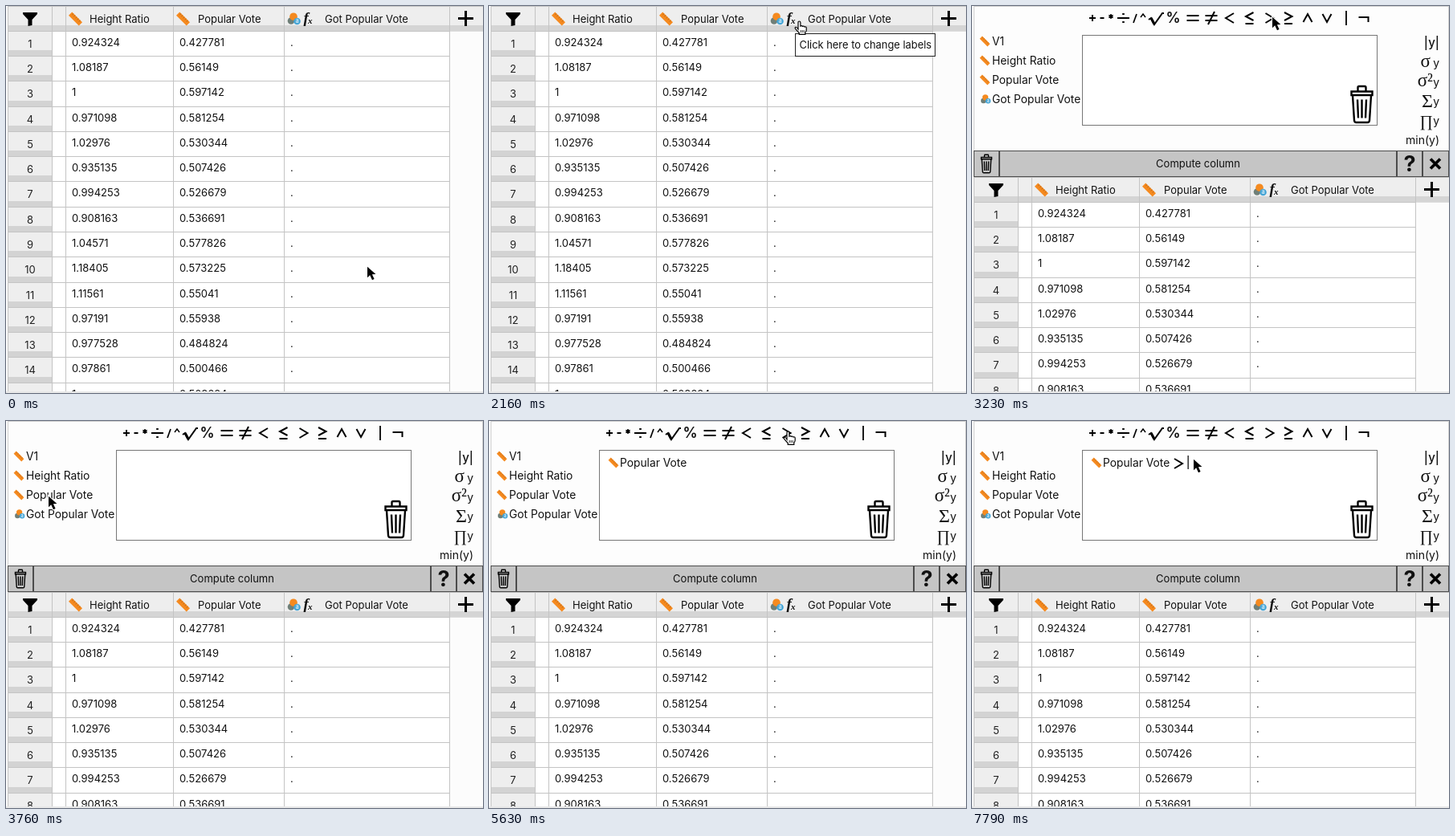
Animation of 594 by 482 pixels, one loop 8 s. Source, as an HTML page with a canvas:

```html
<!DOCTYPE html>
<html lang="en">
<head>
<meta charset="utf-8">
<title>Compute column</title>
<style>
html, body { margin: 0; width: 594px; height: 482px; overflow: hidden; background: #fff; }
canvas { display: block; }
</style>
</head>
<body>
<canvas id="stage" width="594" height="482"></canvas>
<script>
const ctx = document.getElementById('stage').getContext('2d');
const SANS = 'Inter, "Open Sans", sans-serif';
const SERIF = '"Liberation Serif", "Noto Serif", serif';
const LOOP = 8000, ROW = 31.28, PANEL = 213, BOTTOM = 480;
const ORANGE = '#f58a1f', GRID = '#c4c4c4';

const heights = ['0.924324', '1.08187', '1', '0.971098', '1.02976', '0.935135', '0.994253',
  '0.908163', '1.04571', '1.18405', '1.11561', '0.97191', '0.977528', '0.97861', '1'];
const votes = ['0.427781', '0.56149', '0.597142', '0.581254', '0.530344', '0.507426', '0.526679',
  '0.536691', '0.577826', '0.573225', '0.55041', '0.55938', '0.484824', '0.500466', '0.508224'];

// Pointer stops: start time, shape, left, top.
const stops = [
  [0, 'arrow', 449, 324], [270, 'arrow', 439, 0], [540, 'arrow', 416, 34], [810, 'arrow', 453, 43],
  [1080, 'none', 0, 0], [1350, 'arrow', 592, 34], [1620, 'arrow', 416, 25], [1890, 'hand', 380, 22],
  [2160, 'hand', 380, 18], [2420, 'hand', 365, 17], [2690, 'hand', 369, 16], [3230, 'arrow', 373, 13],
  [3490, 'arrow', 174, 75], [3760, 'arrow', 52, 93], [4020, 'arrow', 45, 94], [4560, 'arrow', 209, 62],
  [4820, 'hand', 331, 12], [5090, 'hand', 346, 11], [5360, 'hand', 373, 11], [5630, 'hand', 366, 12],
  [6170, 'hand', 309, 17], [6440, 'arrow', 274, 39], [6710, 'arrow', 270, 47], [6980, 'arrow', 275, 47]
];

// Operator glyphs: centre x, stroke width, path around the row's middle.
const GREATER = 'M-5,-6 L5,0 L-5,6';
const operators = [
  [150, 2, 'M-4,0 H4 M0,-4 V4'],
  [162, 2, 'M-2.5,0 H2.5'],
  [173, 1.5, 'M0,-5 V1 M-2.6,-3.5 L2.6,-.5 M-2.6,-.5 L2.6,-3.5'],
  [188.5, 2, 'M-7.5,0 H7.5 M-1.3,-5 H1.3 M-1.3,5 H1.3'],
  [203, 1.7, 'M2,-5 L-2,6'],
  [213, 1.5, 'M-3,-1 L0,-5 L3,-1'],
  [229, 2, 'M-9,2 L-6,0 L-2,8 L8,-6 H10'],
  [229, 3.2, 'M-6,0 L-2,7.5'],
  [275, 2, 'M-7.5,-3 H7.5 M-7.5,3 H7.5'],
  [298, 2, 'M-7.5,-3 H7.5 M-7.5,3 H7.5 M4,-8 L-4,8'],
  [321, 2, 'M5,-6 L-5,0 L5,6'],
  [345.5, 2, 'M5,-7 L-4.5,-2 L5,3 M-5,7 H5'],
  [370.5, 2, GREATER],
  [394, 2, 'M-5,-7 L4.5,-2 L-5,3 M-5,7 H5'],
  [418, 2, 'M-5.5,5 L0,-5 L5.5,5'],
  [442, 2, 'M-5.5,-5 L0,5 L5.5,-5'],
  [466, 1.8, 'M0,-9 V9'],
  [488, 2, 'M-6.5,-1 H5.5 V5']
].map(([x, width, d]) => [x, width, new Path2D(d)]);

const greater = new Path2D(GREATER);
const funnel = new Path2D('M21,8 H39 V10 L32.5,17 V24 L27.5,25 V17 L21,10 Z');
const arrow = new Path2D('M1,.7 V14.2 L4.2,11.3 L7,17.2 L9.6,16 L6.9,10.3 L11.4,10 Z');
const hand = new Path2D('M5,11 V2.8 Q5,1 6.4,1 Q7.9,1 7.9,2.8 V7 Q9.2,5.9 10.4,7.4 Q11.8,6.4 12.9,8' +
  ' Q15.2,7.4 15.2,9.6 V12 Q15,14 13.8,15 V17.4 H6.2 V15.6 L2,10.9 Q.4,9 1.8,8.3 Q3,7.8 5,11 Z');
const knuckles = new Path2D('M8.2,12 V15 M10.2,12 V15 M12.2,12 V15');
const cross = new Path2D('M-6,-6 L6,6 M6,-6 L-6,6');
const bin = new Path2D('M-13,-16 H13 V-11.5 H-13 Z M-5,-17 V-21 Q-5,-22.5 -3.5,-22.5 H3.5 Q5,-22.5 5,-21 V-17' +
  ' M-11.5,-11 L-9.5,20 Q-9.3,22.5 -7,22.5 H7 Q9.3,22.5 9.5,20 L11.5,-11' +
  ' M-5.5,-6 L-4.5,17 M0,-6 V17 M5.5,-6 L4.5,17');

function text(str, x, y, size, { color = '#111', align = 'left', font = SANS, style = '' } = {}) {
  ctx.font = `${style} ${size}px ${font}`;
  ctx.fillStyle = color;
  ctx.textAlign = align;
  ctx.fillText(str, x, y);
}

function box(x, y, w, h, color) {
  ctx.fillStyle = color;
  ctx.fillRect(x, y, w, h);
}

function frame(x, y, w, h, fill, line) {
  box(x, y, w, h, line);
  box(x + 1, y + 1, w - 2, h - 2, fill);
}

function disc(x, y, r, color) {
  ctx.fillStyle = color;
  ctx.beginPath();
  ctx.arc(x, y, r, 0, Math.PI * 2);
  ctx.fill();
}

function stroke(path, width, color = '#000') {
  ctx.lineWidth = width;
  ctx.strokeStyle = color;
  ctx.stroke(path);
}

function at(x, y, scale, draw) {
  ctx.save();
  ctx.translate(x, y);
  ctx.scale(scale, scale);
  draw();
  ctx.restore();
}

function ruler(x, y, scale = 1) {
  at(x, y, scale, () => {
    ctx.rotate(Math.PI / 4);
    box(-9, -3, 18, 6, ORANGE);
    for (let i = -7; i < 8; i += 3) box(i, -3, 1, 2.5, '#c9701a');
  });
}

function nominal(x, y, scale = 1) {
  at(x, y, scale, () => {
    disc(-3.5, 2.5, 4.3, '#6f7f78');
    disc(-.5, -2.8, 4.8, ORANGE);
    disc(4, 3, 4.3, '#45a5d6');
    text('a', 4, 5.4, 7.5, { color: '#fff', align: 'center' });
  });
}

function trash(x, y, scale, width) {
  at(x, y, scale, () => stroke(bin, width));
}

function table(top) {
  ctx.save();
  ctx.beginPath();
  ctx.rect(0, top, 594, BOTTOM - top);
  ctx.clip();
  ctx.translate(0, top);

  box(2, 0, 592, 31, '#eeeeee');
  box(2, 24, 592, 7, '#d5d5d5');
  box(2, 31, 56, 460, '#eeeeee');
  box(553, 31, 41, 460, '#fcfcfc');
  for (let i = 0; i < 15; i++) {
    const y = Math.floor(ROW * (i + 1));
    const next = Math.floor(ROW * (i + 2));
    box(2, next - 7, 56, 7, '#d3d3d3');
    box(2, y, 551, 1, GRID);
    text(i + 1, 30, y + 21, 13, { color: '#222', align: 'center' });
    text(heights[i], 82, y + 19, 13);
    text(votes[i], 216, y + 19, 13);
    text('.', 354, y + 19, 13);
  }
  for (const x of [57, 74, 208, 346, 552]) box(x, 0, 1, 490, GRID);
  box(2, 0, 1, 490, GRID);
  box(2, 0, 592, 1, GRID);
  box(553, 31, 41, 1, '#dedede');

  ctx.fillStyle = '#000';
  ctx.fill(funnel);
  ruler(86.5, 16);
  ruler(220.5, 16);
  nominal(358.5, 16);
  text('f', 370.5, 20.5, 19, { font: SERIF, style: 'italic bold' });
  text('x', 376, 22, 11, { font: SERIF, style: 'italic bold' });
  text('Height Ratio', 104, 21, 13);
  text('Popular Vote', 239, 21, 13);
  text('Got Popular Vote', 397, 21, 13);
  box(563, 14, 19, 3, '#000');
  box(571, 6, 3, 19, '#000');
  ctx.restore();
}

function panel(t) {
  box(2, 0, 592, PANEL, '#fdfdfd');
  box(2, 0, 1, 180, '#cfcfcf');
  box(593, 0, 1, 180, '#cfcfcf');
  box(2, 0, 592, 1, '#cfcfcf');

  for (const [x, width, path] of operators) at(x, 15, 1, () => stroke(path, width));
  text('%', 250.5, 21, 18, { align: 'center', style: '600' });

  ['V1', 'Height Ratio', 'Popular Vote', 'Got Popular Vote'].forEach((name, i) => {
    const y = 44 + 24 * i;
    if (i < 3) ruler(16, y, .76);
    else nominal(17, y, .76);
    text(name, 25, y + 5, 13.8);
  });

  frame(137, 36, 368, 113, '#fff', '#777');
  trash(485.5, 122.5, 1, 2.4);
  formula(t);

  const right = { align: 'right' };
  const symbol = { align: 'right', font: SERIF };
  text('|y|', 582, 51, 15, { align: 'right', style: '500' });
  [['σ', 23], ['σ²', 23], ['Σ', 24], ['∏', 20]].forEach(([sign, size], i) => {
    const y = 76 + 24 * i;
    text('y', 582, y, 14, right);
    text(sign, i ? 574 : 571, y + (i > 1 ? 2 : 0), size, symbol);
  });
  text('min(y)', 582, 172, 14, right);

  box(2, 180, 592, 33, '#4c4c4c');
  for (const [x, w] of [[3, 30], [35, 493], [530, 30], [562, 31]]) box(x, 181, w, 31, '#c5c5c5');
  trash(18, 196.5, .5, 2.8);
  text('Compute column', 281.5, 201, 13, { align: 'center' });
  text('?', 545, 206, 27, { align: 'center', style: 'bold' });
  at(577, 196.5, 1, () => stroke(cross, 3.6));
}

function formula(t) {
  if (t < 4560) return;
  ruler(155, 52, .76);
  text('Popular Vote', 163, 57, 13.8);
  if (t < 5900) return;
  at(257, 53, 1, () => stroke(greater, 2));
  if (t < 6980) text('...', 269, 57, 13.8);
  else if (t < 7250 || t >= 7790) box(268.5, 43, 1.3, 17, '#111');
}

function tooltip(str, x, y, w, h) {
  frame(x, y, w, h, '#fff', '#222');
  text(str, x + 5.5, y + h - 10, 12.9);
}

function pointer(t) {
  const [, shape, x, y] = stops.filter(stop => stop[0] <= t).pop();
  if (shape === 'none') return;
  at(x, y, 1, () => {
    if (shape === 'hand') {
      ctx.fillStyle = '#fff';
      ctx.fill(hand);
      stroke(hand, 1.2);
      stroke(knuckles, .8);
    } else {
      stroke(arrow, 2, '#fff');
      ctx.fillStyle = '#000';
      ctx.fill(arrow);
    }
  });
}

function draw(now) {
  const t = now % LOOP;
  const open = t >= 3230;
  box(0, 0, 594, 482, '#fff');
  table(open ? PANEL : 0);
  if (open) panel(t);
  box(0, BOTTOM, 594, 2, '#e8e8e8');
  if (t >= 1890 && t < 2420) tooltip('Click here to change labels', 381, 34, 175, 29);
  if (t >= 2960 && !open) tooltip('Click here to change the columns formulas', 240, 27, 271, 28);
  pointer(t);
}

const start = performance.now();
function tick() {
  draw(performance.now() - start);
  requestAnimationFrame(tick);
}
tick();
</script>
</body>
</html>
```
